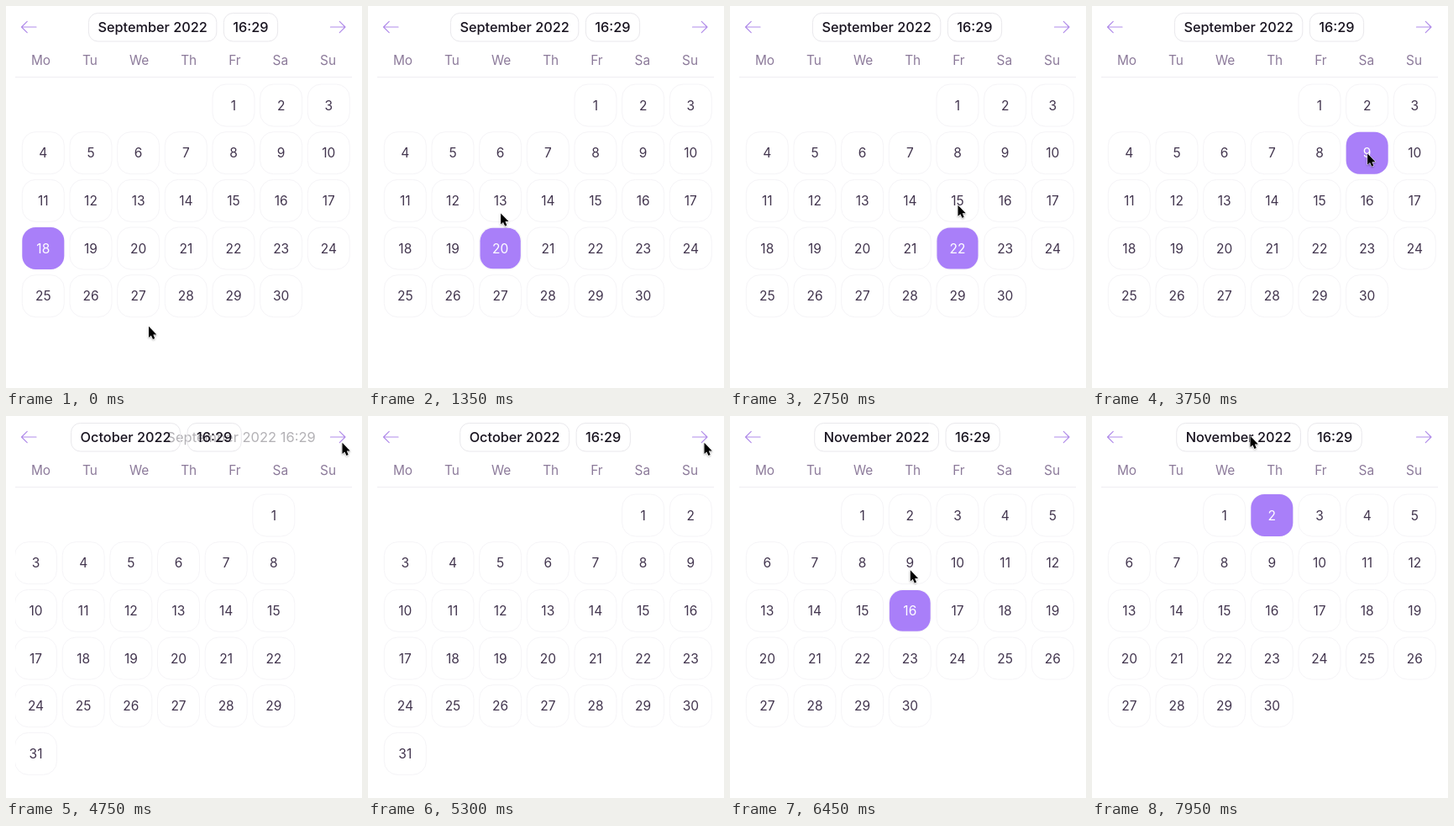
An HTML page for the animation above (8 s loop, 424 px wide and 454 px high).

```html
<!DOCTYPE html>
<html lang="en">
<head>
<meta charset="utf-8">
<title>Date picker</title>
<style>
  html, body { margin: 0; width: 100%; height: 100%; overflow: hidden; background: #fff; }
  body { font-family: Inter, Roboto, sans-serif; }
  svg { position: absolute; left: 0; top: 0; width: 424px; height: 454px; }
  text { text-anchor: middle; }
  .week {
    position: absolute; left: 11px; top: 55px; width: 401px; height: 29px;
    display: flex; justify-content: space-around; border-bottom: 1px solid #efedf2;
    font-size: 15.4px; line-height: 20px; color: #8c7a9a;
  }
  .title { font-size: 16.3px; font-weight: 500; fill: #18131f; }
  .ghost { font-size: 16.5px; fill: #18131f; }
  .day { font-size: 15.5px; fill: #42354e; }
  .pill { fill: none; stroke: #e9e8ec; }
  .cell { fill: #fff; stroke: #f5f4f7; }
  .mark { fill: #a97ff9; }
  .arrow { fill: none; stroke: #b08be9; stroke-width: 1.2; stroke-linecap: round; stroke-linejoin: round; }
</style>
</head>
<body>
<div class="week">
  <span>Mo</span><span>Tu</span><span>We</span><span>Th</span><span>Fr</span><span>Sa</span><span>Su</span>
</div>
<svg id="stage" viewBox="0 0 424 454">
  <defs>
    <clipPath id="page"><rect x="11" y="86" width="401" height="360"/></clipPath>
    <filter id="shade" x="-50%" y="-50%" width="200%" height="200%">
      <feDropShadow dx="0" dy="1" stdDeviation="0.8" flood-opacity="0.35"/>
    </filter>
  </defs>
  <path class="arrow" d="M36 25H18.5m6.7-6.6L18.5 25l6.7 6.6"/>
  <path class="arrow" d="M386.5 25H404m-6.7-6.6L404 25l-6.7 6.6"/>
</svg>
<script>
const LOOP = 8000, SLIDE = 400, TRIP = 350, POP = 250;
const PITCH = 56.67, SIZE = 50, LEFT = 44.3, TOP = 118;
const MIDDLE = 211, PAD = 22, GAP = 8.5;

// start: column of day 1; from: time the month slides in
const months = [
  { name: 'September 2022', start: 4, days: 30, from: -LOOP },
  { name: 'October 2022', start: 5, days: 31, from: 4530 },
  { name: 'November 2022', start: 2, days: 30, from: 5320 }
];
months.forEach((m, i) => { m.to = i < 2 ? months[i + 1].from : 2 * LOOP; });
const [sep, , nov] = months;

// the pointer rests for "stay" after a click, then heads for the next stop
const click = (at, month, day, stay = 0) => ({ at, month, day, leave: at + stay, ...place(month, day) });
const rest = (leave, x, y) => ({ leave, x, y });

const stops = [
  rest(450, 169.5, 380),
  rest(880, 168, 357),
  click(1220, sep, 20),
  click(1800, sep, 6),
  click(2590, sep, 22),
  click(2980, sep, 8),
  click(3400, sep, 9, 650),
  rest(5535, 400, 31),
  click(5950, nov, 24),
  click(6300, nov, 16),
  click(7000, nov, 2, 400),
  rest(LOOP, 188, 23)
];
const picks = [click(-LOOP, sep, 18), ...stops.filter(s => s.day)];

const stage = document.getElementById('stage');
const clamp = v => Math.min(1, Math.max(0, v));

function place(m, day) {
  const slot = m.start + day - 1, col = slot % 7;
  return { col, x: LEFT + col * PITCH, y: TOP + Math.floor(slot / 7) * PITCH };
}

function add(parent, tag, attrs = {}, label) {
  const el = document.createElementNS('http://www.w3.org/2000/svg', tag);
  for (const k in attrs) el.setAttribute(k, attrs[k]);
  if (label !== undefined) el.textContent = label;
  parent.append(el);
  return el;
}

const move = (el, x, y = 0) => el.setAttribute('transform', `translate(${x} ${y})`);
const fade = (el, alpha) => el.setAttribute('opacity', alpha);

function addDay(m, day) {
  const { col, x, y } = place(m, day);
  const g = add(col === 6 ? m.sundays : m.grid, 'g');
  const square = { x: -SIZE / 2, y: -SIZE / 2, width: SIZE, height: SIZE, rx: 16 };
  move(g, x, y);
  add(g, 'rect', { class: 'cell', ...square });
  const mark = add(g, 'rect', { class: 'mark', opacity: 0, ...square });
  const text = add(g, 'text', { class: 'day', y: 5.6 }, day);
  m.cells[day] = { mark, text };
}

function addHead(m) {
  m.head = add(heads, 'g');
  const labels = [m.name, '16:29'].map(s => add(m.head, 'text', { class: 'title', y: 31 }, s));
  const widths = labels.map(el => el.getComputedTextLength() + PAD);
  let x = MIDDLE - (widths[0] + GAP + widths[1]) / 2;
  labels.forEach((el, i) => {
    el.setAttribute('x', x + widths[i] / 2);
    add(m.head, 'rect', { class: 'pill', x, y: 8.5, width: widths[i], height: 33.5, rx: 11 });
    x += widths[i] + GAP;
  });
  m.ghost = add(heads, 'text', { class: 'ghost', x: MIDDLE, y: 31 }, m.name + ' 16:29');
}

const pages = add(stage, 'g', { 'clip-path': 'url(#page)' });
const heads = add(stage, 'g');
for (const m of months) {
  m.grid = add(pages, 'g');
  m.sundays = add(m.grid, 'g');
  m.cells = {};
  for (let day = 1; day <= m.days; day++) addDay(m, day);
  addHead(m);
}
const pointer = add(stage, 'path', {
  d: 'M.5 .8V14L3.4 11.4L5.5 16L7.7 15.1L5.8 10.5H9.8Z',
  fill: '#000', stroke: '#fff', 'paint-order': 'stroke', filter: 'url(#shade)'
});

function drawMonth(m, t) {
  const p = clamp((t - m.from) / SLIDE), q = clamp((t - m.to) / SLIDE);
  const shown = clamp(p / 0.45), leaving = t >= m.to;
  move(m.grid, 40 * q - 44 * (1 - p) ** 2);
  fade(m.grid, shown * clamp(1 - q / 0.45));
  fade(m.sundays, clamp((p - 0.6) / 0.2));
  move(m.head, -800 * (1 - p) ** 4);
  fade(m.head, leaving ? 0 : shown);
  move(m.ghost, 125 * q);
  fade(m.ghost, leaving ? clamp(1 - 1.22 * q) : 0);
}

function drawPick(pick, i, t) {
  const { mark, text } = pick.month.cells[pick.day];
  const next = picks[i + 1];
  const end = next && next.month === pick.month ? next.at : 2 * LOOP;
  const p = clamp((t - pick.at) / POP);
  const alpha = clamp(p / 0.4) * clamp(1 - (t - end) / 120);
  mark.setAttribute('transform', `scale(${1 - 0.15 * (1 - p) ** 2})`);
  fade(mark, alpha);
  text.style.fill = alpha > 0.5 ? '#fff' : '';
}

function drawPointer(t) {
  const next = stops.findIndex(s => s.leave > t);
  const b = stops[next], a = stops[next - 1] || b;
  const k = clamp((t - a.leave) / TRIP);
  move(pointer, a.x + (b.x - a.x) * k, a.y + (b.y - a.y) * k);
}

function draw(t) {
  months.forEach(m => drawMonth(m, t));
  picks.forEach((pick, i) => drawPick(pick, i, t));
  drawPointer(t);
}

const began = performance.now();
function tick() {
  draw((performance.now() - began) % LOOP);
  requestAnimationFrame(tick);
}
draw(0);
requestAnimationFrame(tick);
</script>
</body>
</html>
```
